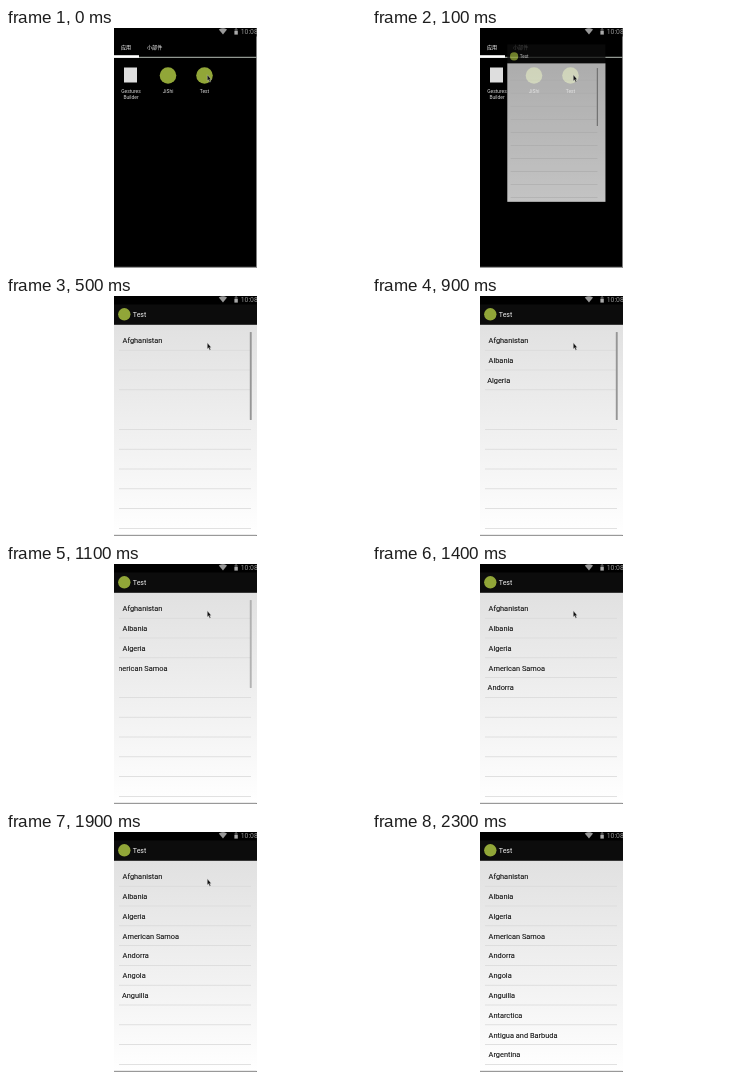
Write an HTML page that moves like this. It is 360 px wide and 240 px high and loops after 2.4 s.

```html
<!DOCTYPE html>
<html lang="en">
<head>
<meta charset="utf-8">
<title>List rows sliding in</title>
<style>
html, body { margin: 0; width: 100%; height: 100%; overflow: hidden; background: #fff; }
svg { display: block; width: 360px; height: 240px; font-family: Roboto, "Noto Sans CJK SC", "Noto Sans CJK", sans-serif; }
</style>
</head>
<body>
<svg viewBox="0 0 360 240">
  <defs>
    <linearGradient id="paper" x1="0" y1="0" x2="0" y2="1">
      <stop offset="0" stop-color="#e1e1e1"/>
      <stop offset=".55" stop-color="#f1f1f1"/>
      <stop offset="1" stop-color="#fff"/>
    </linearGradient>
    <clipPath id="screen"><rect x="108" width="143" height="240"/></clipPath>
    <clipPath id="list"><rect x="113" y="28" width="132" height="212"/></clipPath>
  </defs>
  <g clip-path="url(#screen)">
    <rect x="108" width="142.5" height="240"/>
    <g id="launcher" fill="#fff">
      <g font-size="5.1" font-weight="500">
        <text x="115" y="21">应用</text>
        <text x="141" y="21">小部件</text>
      </g>
      <rect x="108" y="28.8" width="142.5" height="1" fill="#b5bcb5"/>
      <rect x="108" y="27.2" width="25" height="2.6"/>
      <rect x="118" y="39.5" width="13" height="15" fill="#dedede"/>
      <circle cx="162" cy="47.5" r="8.3" fill="#91a638"/>
      <circle cx="198.5" cy="47.5" r="8.3" fill="#91a638"/>
      <g font-size="4.9" text-anchor="middle" fill="#d8d8d8">
        <text x="125" y="65.3">Gestures</text>
        <text x="125" y="71">Builder</text>
        <text x="162" y="65.3">JiShi</text>
        <text x="198.5" y="65.3">Test</text>
      </g>
    </g>
    <g id="app">
      <rect x="108" width="149" height="29" fill="#0c0c0c"/>
      <rect x="108" y="28.8" width="149" height="210.2" fill="url(#paper)"/>
      <circle cx="118.3" cy="18.3" r="6.2" fill="#91a638"/>
      <text x="126.8" y="21" font-size="7" fill="#eee">Test</text>
      <g id="dividers" fill="#dadada"></g>
      <g id="rows" clip-path="url(#list)" font-size="7.4" fill="#0c0c0c" stroke="#0c0c0c" stroke-width=".08"></g>
      <rect id="scrollbar" x="243.8" y="36" width="1.9" height="88" rx=".5" fill="#969696"/>
    </g>
    <g id="status">
      <rect x="108" width="142.5" height="8.5"/>
      <path d="M212.8 1.4Q217 -1 221 1.4L217 6.4Z" fill="#999"/>
      <path d="M228.6 3V1H229.4V0H230.8V1H231.6V3Z" fill="#555"/>
      <rect x="228.4" y="3" width="3.4" height="3.6" fill="#aaa"/>
      <text x="234.8" y="6.2" font-size="6.8" fill="#939393">10:08</text>
    </g>
    <rect x="108" y="238.8" width="142.5" height="1.2" fill="#999"/>
    <path id="cursor" d="M201.3 46.8V53L202.6 51.8L203.7 54.2L204.7 53.7L203.7 51.4H205.3Z" fill="#111" stroke="#eee" stroke-width=".35"/>
  </g>
</svg>
<script>
const LOOP = 2400, STEP = 100, PITCH = 19.8, SLIDE = 250, OPEN = 332;
const countries = ["Afghanistan", "Albania", "Algeria", "American Samoa", "Andorra",
  "Angola", "Anguilla", "Antarctica", "Antigua and Barbuda", "Argentina"];
const $ = id => document.getElementById(id);
const clamp = v => Math.min(1, Math.max(0, v));
const easeOut = (p, power) => 1 - (1 - clamp(p)) ** power;

function add(parent, tag, attrs, text = "") {
  const el = document.createElementNS("http://www.w3.org/2000/svg", tag);
  for (const key in attrs) el.setAttribute(key, attrs[key]);
  el.textContent = text;
  return parent.appendChild(el);
}

const dividers = countries.map((_, i) =>
  add($("dividers"), "rect", { x: 113, y: 53.8 + i * PITCH, width: 132, height: .8 }));
const rows = countries.map((name, i) =>
  add($("rows"), "text", { x: 116.6, y: 47.2 + i * PITCH }, name));

// The last three rows follow each other faster.
const arrival = i => i < 7 ? 430 + 248 * i : 2100 + 100 * (i - 7);
const show = (el, visible) => el.setAttribute("visibility", visible ? "visible" : "hidden");

function render(t) {
  const scale = easeOut(t / OPEN, 3);
  $("app").setAttribute("transform", `translate(188 48) scale(${scale}) translate(-188 -48)`);
  $("app").setAttribute("opacity", clamp(t / 130));
  show($("launcher"), t < 400);

  rows.forEach((row, i) => {
    const p = easeOut(1 - (arrival(i) - t) / SLIDE, 2);
    row.setAttribute("transform", `translate(${-132 * (1 - p)} 0)`);
  });
  show(dividers[3], t < 400 || t >= arrival(3));
  $("scrollbar").setAttribute("opacity", clamp((1300 - t) / 300));
  show($("cursor"), t < 2300);
}

function tick(now) {
  render(Math.floor(now % LOOP / STEP) * STEP);
  requestAnimationFrame(tick);
}
render(0);
requestAnimationFrame(tick);
</script>
</body>
</html>
```
